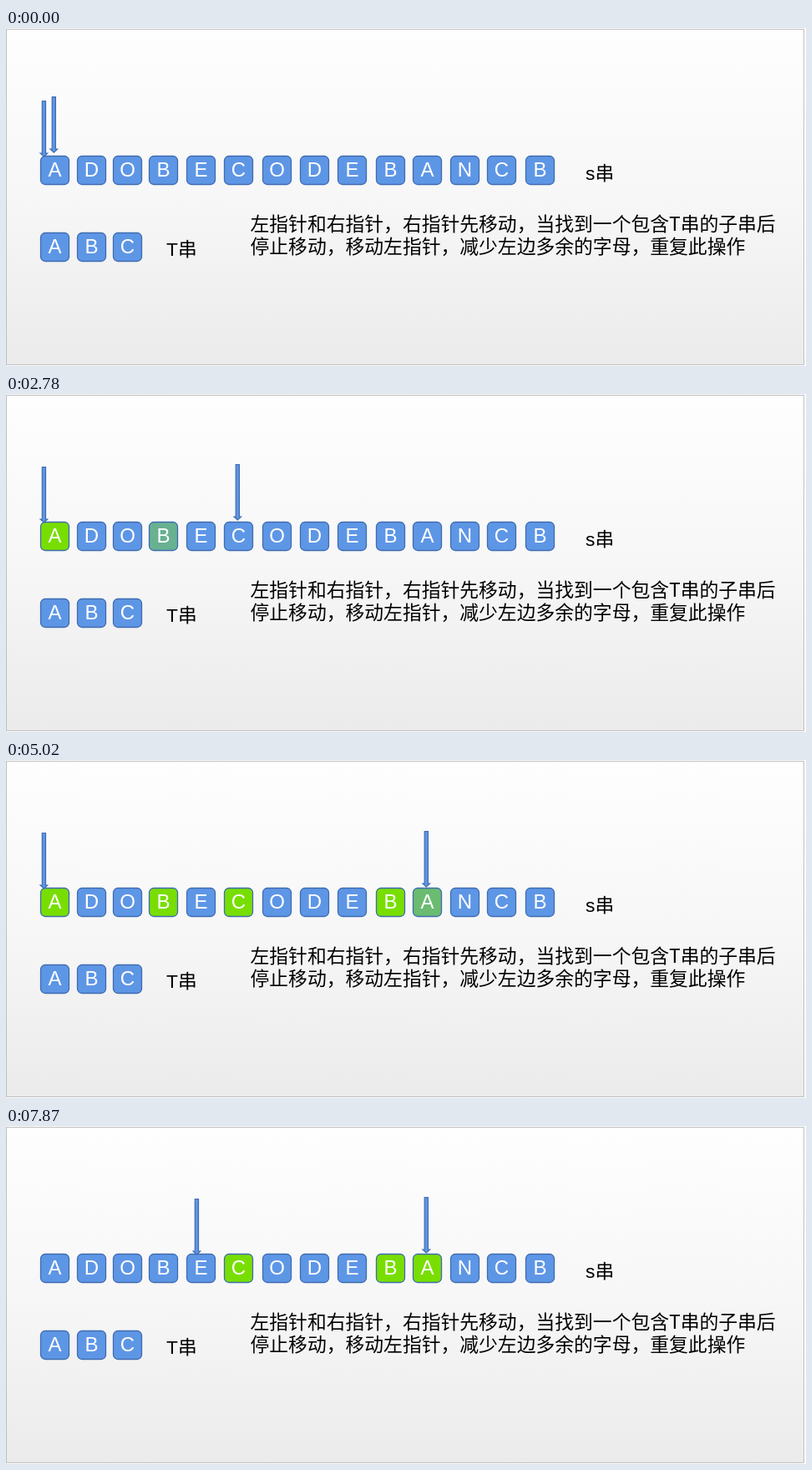
An HTML page with a canvas that plays this animation: 958 px wide and 405 px high, repeating every 8 s.

```html
<!DOCTYPE html>
<html lang="zh-CN">
<head>
<meta charset="utf-8">
<title>滑动窗口</title>
<style>
html, body { margin: 0; width: 958px; height: 405px; overflow: hidden; background: #fff; }
canvas { display: block; }
</style>
</head>
<body>
<canvas id="stage" width="958" height="405"></canvas>
<script>
const ctx = document.getElementById('stage').getContext('2d');
const LOOP = 8000, TICK = 77.1;
const BLUE = [94, 150, 230], GREEN = [120, 222, 2], EDGE = '#3f6cb0';
const LATIN = '"Liberation Sans", Arial, sans-serif';
const CJK = '"Noto Sans CJK SC", "Noto Sans CJK", sans-serif';
const WORD = 'ADOBECODEBANCB';
const TILE_X = [41, 85, 128, 171, 216, 261, 307, 352, 397, 443, 487, 532, 576, 622];

// Tile index -> when it starts turning green, and when it snaps back
const MARKS = {
  0: { on: 2040, off: 7318 },
  3: { on: 2590, off: 7860 },
  5: { on: 3140 },
  9: { on: 4225 },
  10: { on: 4755 }
};

const clamp = u => Math.min(1, Math.max(0, u));
const progress = (t, start, length) => clamp((t - start) / length);
const ease = u => u < 0.5 ? 2 * u * u : 1 - 2 * (1 - u) * (1 - u);

function text(str, x, y, size, family, color, align = 'left') {
  ctx.font = `${size}px ${family}`;
  ctx.textAlign = align;
  ctx.fillStyle = color;
  ctx.fillText(str, x, y);
}

function tile(letter, x, y, green) {
  const rgb = BLUE.map((c, i) => Math.round(c + (GREEN[i] - c) * green));
  ctx.beginPath();
  ctx.roundRect(x + 0.5, y + 0.5, 34, 34, 5.5);
  ctx.fillStyle = `rgb(${rgb})`;
  ctx.fill();
  ctx.strokeStyle = EDGE;
  ctx.lineWidth = 1.3;
  ctx.stroke();
  text(letter, x + 17.5, y + 25.4, 24, LATIN, '#fff', 'center');
}

function arrow(x, top) {
  const tip = top + 66.5, neck = tip - 4;
  ctx.beginPath();
  ctx.moveTo(x - 2.1, top);
  ctx.lineTo(x + 2.1, top);
  ctx.lineTo(x + 2.1, neck);
  ctx.lineTo(x + 4.3, neck);
  ctx.lineTo(x, tip);
  ctx.lineTo(x - 4.3, neck);
  ctx.lineTo(x - 2.1, neck);
  ctx.closePath();
  ctx.fillStyle = `rgb(${BLUE})`;
  ctx.fill();
  ctx.strokeStyle = EDGE;
  ctx.lineWidth = 1.2;
  ctx.stroke();
}

function background() {
  ctx.fillStyle = '#fff';
  ctx.fillRect(0, 0, 958, 405);
  const g = ctx.createLinearGradient(0, 1, 0, 404);
  g.addColorStop(0, '#fefefe');
  g.addColorStop(0.5, '#f7f7f7');
  g.addColorStop(1, '#ebebeb');
  ctx.fillStyle = g;
  ctx.fillRect(0, 1, 956, 403);
  ctx.strokeStyle = '#bfbfbf';
  ctx.lineWidth = 1;
  ctx.strokeRect(0.5, 1.5, 955, 402);
}

function greenAmount(i, t) {
  const m = MARKS[i];
  if (!m || t >= m.off) return 0;
  return progress(t, m.on, 500);
}

function draw(t) {
  background();
  [...WORD].forEach((c, i) => tile(c, TILE_X[i], 153, greenAmount(i, t)));
  [...'ABC'].forEach((c, i) => tile(c, TILE_X[i], 245, 0));

  text('s', 694, 181.5, 22.7, LATIN, '#000');
  text('串', 705.4, 181.7, 22.7, CJK, '#000');
  text('T', 192, 272.5, 22.7, LATIN, '#000');
  text('串', 206, 272.7, 22.7, CJK, '#000');
  text('左指针和右指针，右指针先移动，当找到一个包含T串的子串后', 292.5, 243, 22.8, CJK, '#000');
  text('停止移动，移动左指针，减少左边多余的字母，重复此操作', 292.5, 270.3, 22.8, CJK, '#000');

  const first = ease(progress(t, 10, 2000));
  const second = ease(progress(t, 3700, 500));
  const left = ease(progress(t, 5275, 2000));
  arrow(45.4 + 183 * left, 87.5);
  arrow(57.3 + 220 * first + 226 * second, 82.7 + 1.8 * first + second);
}

function loop(now) {
  const t = now % LOOP;
  draw(Math.floor(t / TICK) * TICK);
  requestAnimationFrame(loop);
}

draw(0);
requestAnimationFrame(loop);
</script>
</body>
</html>
```
